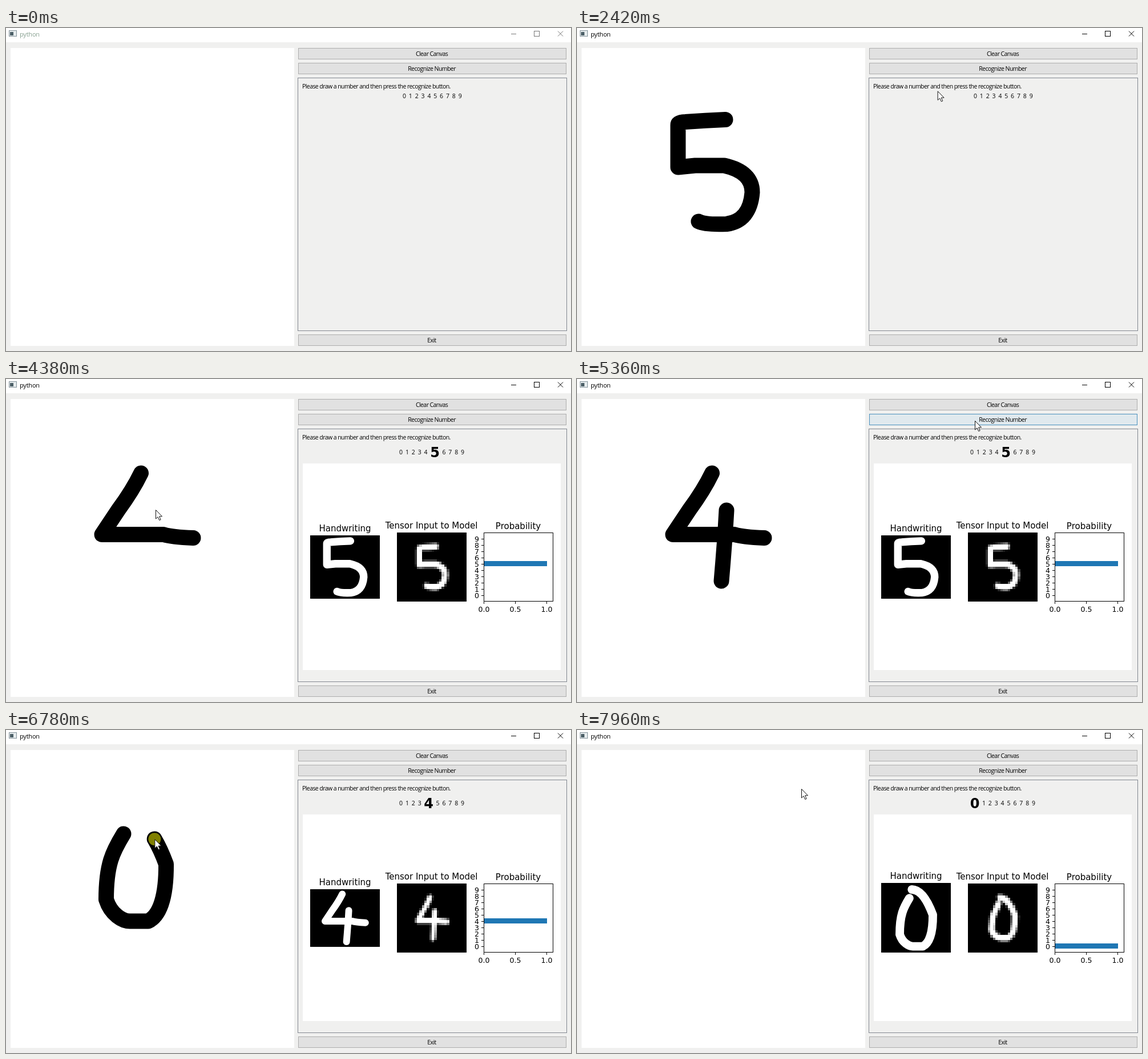
Write an HTML page with a canvas that moves like this. It is 990x566 px and loops after 8000 ms.

```html
<!DOCTYPE html>
<html lang="en">
<head>
<meta charset="utf-8">
<title>Number recognizer</title>
<style>
  html, body { margin: 0; width: 100%; height: 100%; overflow: hidden; background: #f0f0ef; }
  canvas { display: block; width: 990px; height: 566px; }
</style>
</head>
<body>
<canvas id="stage" width="990" height="566"></canvas>
<script>
const LOOP = 8000, PEN = 27, TICK = 70;
const ctx = document.getElementById('stage').getContext('2d');
const UI = '"Open Sans", "Noto Sans", sans-serif';
const PLOT = '"DejaVu Sans", sans-serif';

function makePath(d) {
  const el = document.createElementNS('http://www.w3.org/2000/svg', 'path');
  el.setAttribute('d', d);
  const length = el.getTotalLength();
  return { shape: new Path2D(d), length, at: k => el.getPointAtLength(k * length) };
}

// A handwritten digit with the bounds of its ink.
function makeDigit(...outlines) {
  const strokes = outlines.map(makePath);
  const points = strokes.flatMap(s => Array.from({ length: 101 }, (_, i) => s.at(i / 100)));
  const range = axis => {
    const values = points.map(p => p[axis]);
    const low = Math.min(...values), high = Math.max(...values);
    return { center: (low + high) / 2, size: high - low + PEN };
  };
  return { strokes, x: range('x'), y: range('y') };
}

const digits = {
  5: makeDigit('M260 160.5Q225 162 190 164.5Q177 165 177 170V244L207 241H258Q307 252 307 288Q303 338 262 343.5Q225 345 213 339'),
  4: makeDigit('M236.5 165Q222 195 197 229L168 272.5H276Q290 277 328 278.5', 'M262 230Q259 285 253 354'),
  0: makeDigit('M206 182C187 213 175.5 235 175.5 297C184 324 205 335 217 335H249C270 325 281 290 280.5 235C262 185 240 155 214 154.5')
};

// The pointer's tour: each move starts where the previous part ended.
const timeline = [];
function add(start, end, path, pen = false, power = 1) {
  timeline.push({ start, end, path, pen, power });
}
function moveTo(start, end, x, y) {
  const from = timeline[timeline.length - 1].path.at(1);
  add(start, end, makePath(`M${from.x} ${from.y}L${x} ${y}`));
}
function write(start, end, digit, index = 0, power = 1) {
  add(start, end, digits[digit].strokes[index], true, power);
}
add(120, 830, makePath('M536 419L291 340L148 190C115 160 150 147 260 160.5'));
write(950, 1860, 5, 0, 1.21);
moveTo(1930, 2500, 700, 73);
moveTo(2700, 2980, 269, 271);
moveTo(3190, 3400, 236.5, 165);
write(3460, 4100, 4);
moveTo(4170, 4380, 262, 229);
write(4450, 4730, 4, 1);
moveTo(4800, 5110, 697, 73);
moveTo(5500, 5960, 368, 145);
moveTo(5960, 6200, 204, 181);
write(6340, 6830, 0);
moveTo(6900, 7530, 697, 73);
moveTo(7740, 7950, 393, 103);

const results = [[5, 2560], [4, 5290], [0, 7600]]
  .map(([digit, press]) => ({ digit, press, shown: press + 2 * TICK }));

function drawDigit(c, digit, x, y, scaleX, scaleY) {
  c.save();
  c.translate(x, y);
  c.scale(scaleX, scaleY);
  c.translate(-digit.x.center, -digit.y.center);
  c.strokeStyle = '#fff';
  c.lineWidth = PEN;
  c.lineCap = c.lineJoin = 'round';
  digit.strokes.forEach(s => c.stroke(s.shape));
  c.restore();
}

// The cropped drawing is squeezed into 20 x 20 cells inside a 28 x 28 image.
for (const digit of Object.values(digits)) {
  digit.cropWidth = digit.x.size + 89;
  digit.cropHeight = digit.y.size + 13;
  digit.pixels = document.createElement('canvas');
  digit.pixels.width = digit.pixels.height = 28;
  const c = digit.pixels.getContext('2d');
  c.fillRect(0, 0, 28, 28);
  drawDigit(c, digit, 14.2, 14, 20 / digit.cropWidth, 20 / digit.cropHeight);
}

function fill(x, y, w, h, color) {
  ctx.fillStyle = color;
  ctx.fillRect(x, y, w, h);
}
function outline(x, y, w, h, color) {
  ctx.strokeStyle = color;
  ctx.lineWidth = 1;
  ctx.strokeRect(x + 0.5, y + 0.5, w - 1, h - 1);
}
function line(x1, y1, x2, y2, color = '#000') {
  ctx.strokeStyle = color;
  ctx.lineWidth = 1;
  ctx.beginPath();
  ctx.moveTo(x1, y1);
  ctx.lineTo(x2, y2);
  ctx.stroke();
}
function text(str, x, y, font, align = 'center', spacing = 0, color = '#000') {
  ctx.font = font;
  ctx.textAlign = align;
  ctx.letterSpacing = spacing + 'px';
  ctx.fillStyle = color;
  ctx.fillText(str, x, y);
}
const label = (str, x, y, align) => text(str, x, y, '10.5px ' + UI, align, -0.57);

function button(str, y, hot) {
  fill(512, y, 470, 20, hot ? '#e0e9ee' : '#e1e1e1');
  outline(512, y, 470, 20, hot ? '#4a90bd' : '#adadad');
  label(str, 746, y + 14);
}

function drawWindow(active, hot) {
  fill(0, 0, 990, 566, '#f0f0ef');
  fill(0, 0, 990, 25, '#fff');
  fill(5, 4, 14, 11, '#e6ecee');
  outline(5, 4, 14, 11, '#84929a');
  fill(7, 7, 6, 6, '#4d6068');
  text('python', 24, 15, '11px ' + UI, 'left', -0.2, active ? '#000' : '#87a090');
  const ink = active ? '#000' : '#777';
  line(885, 10.5, 894, 10.5, ink);
  outline(925, 5, 10, 10, ink);
  line(967, 5.5, 976, 14.5, ink);
  line(976, 5.5, 967, 14.5, ink);

  fill(8, 35, 497, 522, '#fff');
  button('Clear Canvas', 35);
  button('Recognize Number', 61, hot);
  button('Exit', 537);
  outline(511, 87, 472, 444, '#828790');
  label('Please draw a number and then press the recognize button.', 519, 106, 'left');
}

function drawDigitRow(found) {
  for (let i = 0; i < 10; i++) {
    if (found === undefined) label(i, 697.7 + 10.85 * i, 123);
    else if (i === found) text(i, 697 + 10.9 * i, 137, 'bold 24px ' + PLOT);
    else label(i, 691.7 + 10.9 * i + (i > found ? 10 : 0), 132);
  }
}

function drawPlots(found) {
  const digit = digits[found], title = '15px ' + PLOT, tick = '12.5px ' + PLOT;
  fill(520, 148, 452, 362, '#fff');

  const scale = 122 / digit.cropWidth;
  const height = Math.round(digit.cropHeight * scale);
  const top = Math.round(329 - height / 2);
  fill(533, top, 122, height, '#000');
  drawDigit(ctx, digit, 594.5, 329.3, scale, scale);
  text('Handwriting', 594, top - 7, title);

  ctx.imageSmoothingEnabled = false;
  ctx.drawImage(digit.pixels, 685, 268.5, 122, 121);
  text('Tensor Input to Model', 745.5, 262, title);

  const rowY = k => 378.5 - 11 * k;
  text('Probability', 897.5, 262.5, title);
  fill(838, rowY(found) - 4.5, 110, 9, '#1f77b4');
  outline(837, 269, 122, 121, '#000');
  for (let k = 0; k < 10; k++) {
    line(833, rowY(k) + 1, 837, rowY(k) + 1);
    text(k, 829, rowY(k) + 5.5, tick, 'right');
  }
  ['0.0', '0.5', '1.0'].forEach((str, i) => {
    const x = 837.5 + 55 * i;
    line(x, 390, x, 394);
    text(str, x, 408, tick);
  });
}

// Ink up to a fraction of the path.
function drawInk(path, progress) {
  ctx.save();
  ctx.strokeStyle = '#000';
  ctx.lineWidth = PEN;
  ctx.lineCap = ctx.lineJoin = 'round';
  ctx.setLineDash([path.length * progress + 0.01, path.length * 2]);
  ctx.stroke(path.shape);
  ctx.restore();
}

function drawCursor({ x, y }, pressed) {
  ctx.save();
  ctx.translate(x, y);
  if (pressed) {
    ctx.fillStyle = 'rgba(255,255,0,.5)';
    ctx.beginPath();
    ctx.arc(0, 0, 11, 0, 7);
    ctx.fill();
  }
  const arrow = new Path2D('M.5 .5V16L4 12.7L6.7 18.5L9.1 17.5L6.6 11.8H11.5Z');
  ctx.fillStyle = '#fff';
  ctx.fill(arrow);
  ctx.strokeStyle = '#111';
  ctx.lineWidth = 1;
  ctx.stroke(arrow);
  ctx.restore();
}

function render(t) {
  const progress = s => Math.min(1, (t - s.start) / (s.end - s.start)) ** s.power;
  const result = results.filter(r => r.shown <= t).pop();
  const clearedAt = result ? result.shown : 0;
  const played = timeline.filter(s => s.start <= t);
  const last = played[played.length - 1];
  const cursor = last && last.path.at(progress(last));
  const hot = cursor && cursor.x > 512 && cursor.y >= 61 && cursor.y < 81;
  const clicking = results.some(r => t >= r.press && t < r.press + TICK);

  drawWindow(t >= 950, hot);
  drawDigitRow(result && result.digit);
  if (result) drawPlots(result.digit);
  played.filter(s => s.pen && s.start >= clearedAt).forEach(s => drawInk(s.path, progress(s)));
  if (cursor) drawCursor(cursor, clicking || (last.pen && t <= last.end));
}

// The picture advances in steps of one tick.
const began = performance.now();
function frame() {
  const t = (performance.now() - began) % LOOP;
  render(950 + Math.floor((t - 950) / TICK) * TICK);
  requestAnimationFrame(frame);
}
frame();
</script>
</body>
</html>
```
